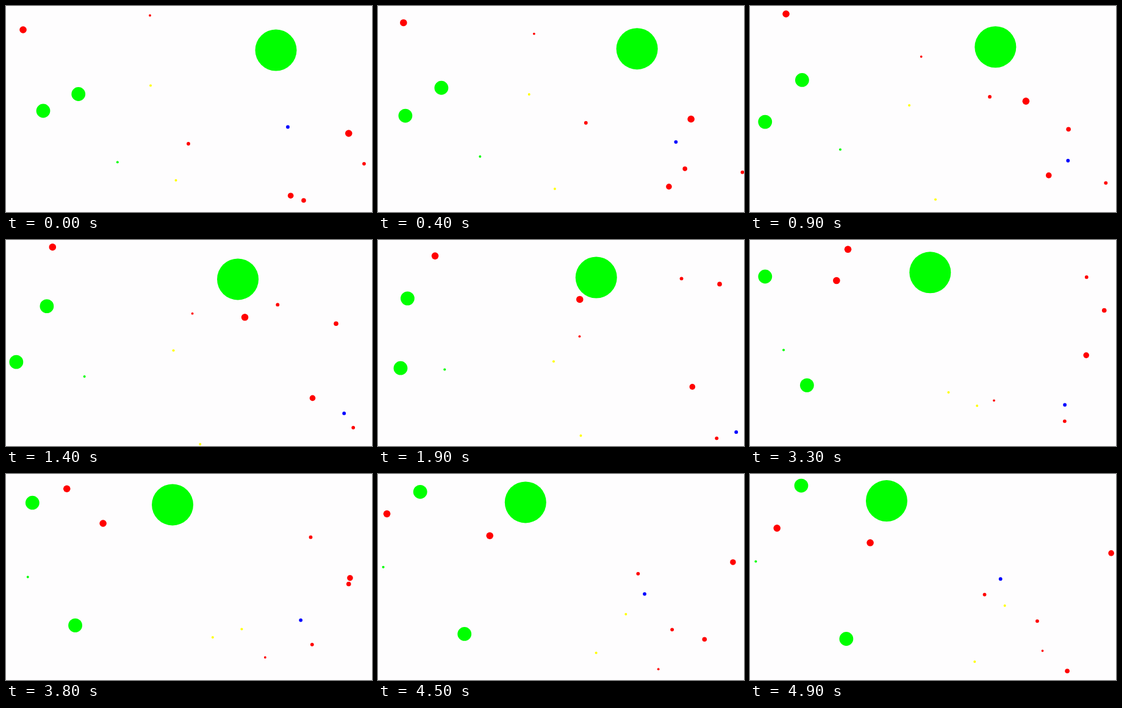
Write an HTML page with a canvas that moves like this. It is 600 by 338 pixels and loops after 5 s.

```html
<!DOCTYPE html>
<html lang="en">
<head>
<meta charset="utf-8">
<title>Bouncing balls</title>
<style>
html, body { margin: 0; width: 100%; height: 100%; overflow: hidden; background: #fefdfe; }
canvas { display: block; }
</style>
</head>
<body>
<canvas id="stage" width="600" height="338"></canvas>
<script>
const W = 600, H = 338, STEP = 100, LOOP = 5000;
const OVERSHOOT = 0.7; // how far a ball dips into a wall before it turns
const ctx = document.getElementById('stage').getContext('2d');
const balls = [];

function add(color, r, x, y, vx, vy) { // speed in pixels per second
  balls.push({ color, r, x, y, vx, vy });
}

add('lime', 34, 442.5, 72.5, -44.6, -5.8);
add('lime', 11.4, 118.7, 144.5, -37, -25.6);
add('lime', 11.4, 61, 172, -40.3, 20.1);
add('lime', 2, 182.8, 256.3, -38.7, -23);
add('red', 5.8, 28, 39, 34.5, -28.9);
add('red', 5.8, 561.8, 209, -121.6, -58.7);
add('red', 4.8, 466.7, 311.2, 25.6, -37);
add('red', 3.8, 488, 319, 37.9, -129.8);
add('red', 2.9, 299, 226, 104.5, -85.6);
add('red', 2.9, 587, 258.8, 28.1, 35);
add('red', 1.9, 236, 15.5, 49.7, 75.1);
add('blue', 2.9, 462, 198.5, 65.9, 61.4);
add('yellow', 2, 237, 130.5, 26.8, 36.2);
add('yellow', 2, 278.5, 286, 28.4, 35);

// Fold a straight path back and forth between two walls.
function bounce(p, r, size) {
  const inset = r - OVERSHOOT, span = size - 2 * inset;
  const d = Math.abs(p - inset) % (2 * span);
  return inset + Math.min(d, 2 * span - d);
}

function draw(ms) {
  const t = Math.floor((ms % LOOP) / STEP) * STEP / 1000;
  ctx.clearRect(0, 0, W, H);
  for (const { color, r, x, y, vx, vy } of balls) {
    ctx.fillStyle = color;
    ctx.beginPath();
    ctx.arc(bounce(x + vx * t, r, W), bounce(y + vy * t, r, H), r, 0, 2 * Math.PI);
    ctx.fill();
  }
}

let start;
function tick(now) {
  start ??= now;
  draw(now - start);
  requestAnimationFrame(tick);
}
draw(0);
requestAnimationFrame(tick);
</script>
</body>
</html>
```
